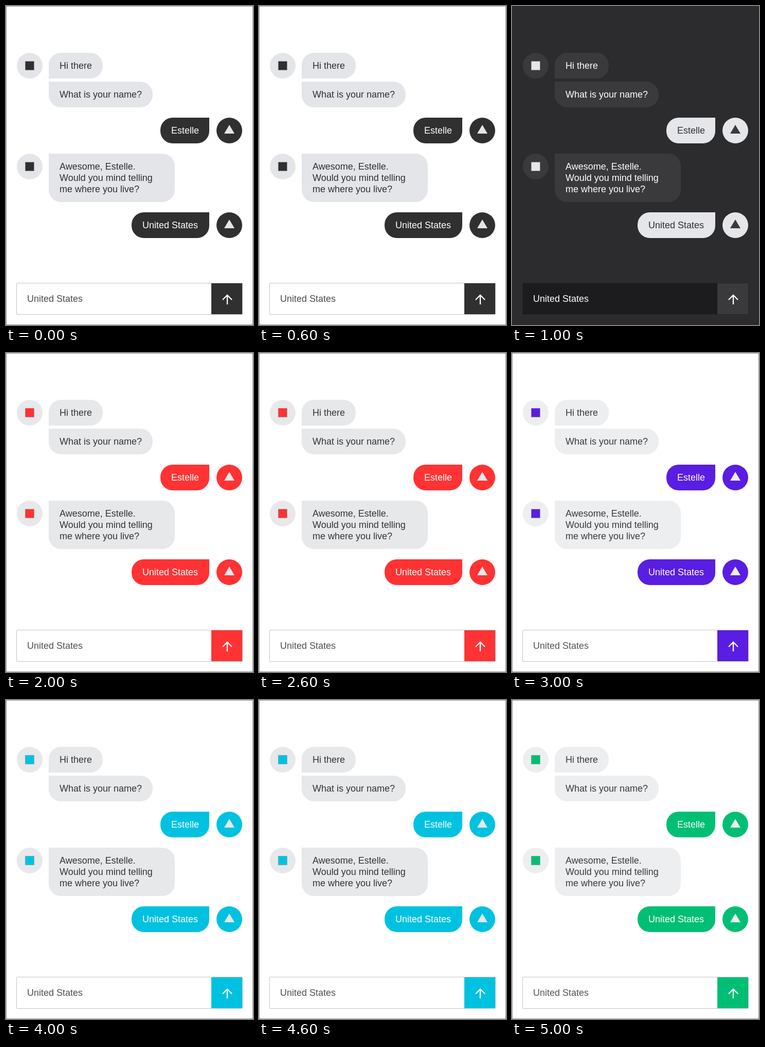
Animation, 480 px wide and 620 px high, one loop 6000 ms. Source, as an HTML page:

```html
<!DOCTYPE html>
<html lang="en">
<head>
<meta charset="utf-8">
<title>Chat themes</title>
<style>
  html, body { margin: 0; width: 100%; height: 100%; overflow: hidden; }
  svg { display: block; width: 480px; height: 620px; }
  text { font: 18px "Liberation Sans", Arial, sans-serif; fill: var(--text); }
  .page { fill: var(--page); }
  .frame { fill: none; stroke: var(--frame); }
  .bot { fill: var(--bubble); }
  .user { fill: var(--accent); }
  .square { fill: var(--square); stroke: #88888c; stroke-opacity: .55; }
  .triangle { fill: var(--triangle); }
  .reply { fill: var(--reply); }
  .field { fill: var(--field); stroke: var(--border); }
  .entry { fill: var(--entry); }
  .button { fill: var(--button); }
  .arrow { fill: none; stroke: var(--arrow); stroke-width: 2.3; }
  .edge { fill: var(--edge); }
</style>
</head>
<body>
<svg id="stage" viewBox="0 0 480 620"></svg>
<script>
const stage = document.getElementById('stage');

// Corner radii run clockwise from the top left.
function bubble(kind, x, y, w, h, [tl, tr, br, bl]) {
  return `<path class="${kind}" d="M${x + tl} ${y}H${x + w - tr}
    a${tr} ${tr} 0 0 1 ${tr} ${tr}V${y + h - br}
    a${br} ${br} 0 0 1 ${-br} ${br}H${x + bl}
    a${bl} ${bl} 0 0 1 ${-bl} ${-bl}V${y + tl}
    a${tl} ${tl} 0 0 1 ${tl} ${-tl}z"/>`;
}

const label = (kind, x, y, words) => `<text class="${kind}" x="${x}" y="${y}">${words}</text>`;

const botAvatar = y => `<circle class="bot" cx="46" cy="${y}" r="25"/>
  <rect class="square" x="37.5" y="${y - 8.5}" width="17" height="17"/>`;

const userAvatar = y => `<circle class="user" cx="434" cy="${y}" r="25"/>
  <path class="triangle" d="M434 ${y - 11}l10 17h-20z"/>`;

function botMessage(y, width, lines, corners) {
  return bubble('bot', 83, y, width, 28 + 22 * lines.length, corners)
    + lines.map((line, i) => label('', 104, y + 31 + 22 * i, line)).join('');
}

function userMessage(y, x, words) {
  return bubble('user', x, y, 395 - x, 50, [24, 0, 24, 24])
    + label('reply', x + 21, y + 31, words) + userAvatar(y + 25);
}

stage.innerHTML = `
  <rect class="page" width="480" height="620"/>
  <rect class="edge" y="616" width="480" height="4"/>
  <rect class="frame" x=".5" y=".5" width="479" height="619"/>`
  + botAvatar(116)
  + botMessage(91, 105, ['Hi there'], [24, 24, 24, 0])
  + botMessage(147, 202, ['What is your name?'], [0, 24, 24, 24])
  + userMessage(217, 300, 'Estelle')
  + botAvatar(312)
  + botMessage(287, 245, ['Awesome, Estelle.', 'Would you mind telling', 'me where you live?'], [0, 24, 24, 24])
  + userMessage(401, 244, 'United States')
  + `<rect class="field" x="20.5" y="538.5" width="439" height="61" rx="1.5"/>
  <path class="button" d="M399 539h60v60h-60z"/>
  <path class="arrow" d="M430 580V562M421 571l9-9 9 9"/>`
  + label('entry', 41, 575, 'United States');

const light = (accent, bubble, text, entry) => ({
  page: '#fff', frame: '#8c8c8c', edge: 'none', bubble, accent, text, entry,
  square: accent, triangle: bubble, reply: '#fff', field: '#fff',
  border: '#c4c4c6', button: accent, arrow: '#fff'
});

const dark = {
  page: '#2c2c2e', frame: 'none', edge: '#30282c', bubble: '#3a3a3c',
  accent: '#e5e6ea', text: '#fff', entry: '#fff', square: '#e5e6ea',
  triangle: '#3a3a3c', reply: '#303033', field: '#1c1c1e',
  border: 'none', button: '#3a3a3c', arrow: '#fff'
};

const themes = [
  light('#303030', '#e4e5e9', '#303033', '#4c4c50'),
  dark,
  light('#ff3333', '#e7e8ea', '#343437', '#505054'),
  light('#5a1de2', '#edeef0', '#3a3a3d', '#555558'),
  light('#00c2e0', '#e7e8ea', '#343437', '#505054'),
  light('#00bf75', '#edeef0', '#3a3a3d', '#555558')
];

const start = performance.now();
let shown = -1;

function draw() {
  const index = Math.floor((performance.now() - start) / 1000) % themes.length;
  if (index !== shown) {
    shown = index;
    for (const [name, color] of Object.entries(themes[index]))
      stage.style.setProperty('--' + name, color);
  }
  requestAnimationFrame(draw);
}
draw();
</script>
</body>
</html>
```
